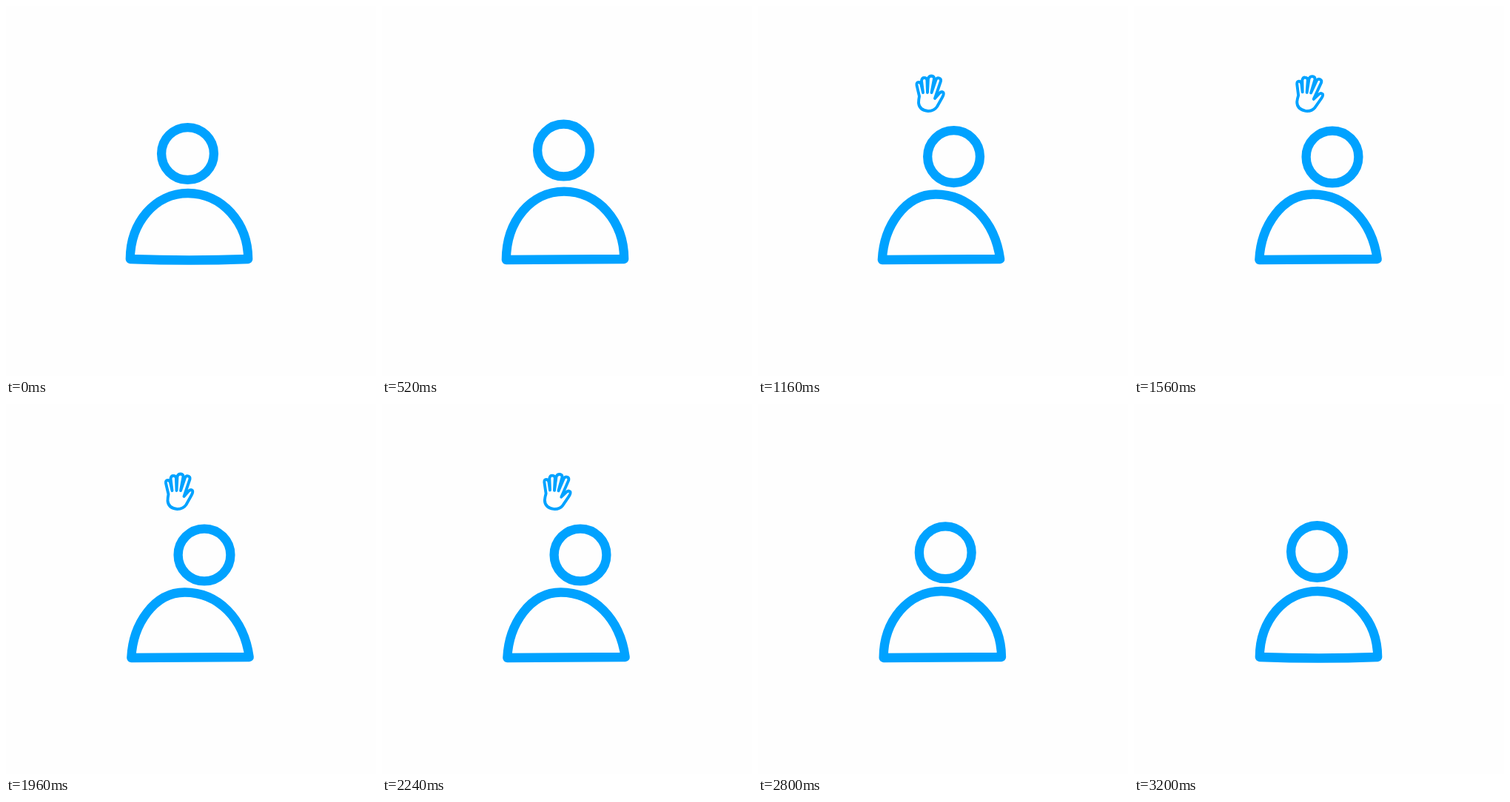
Recreate the animation shown at these times as an HTML page. Size 500 px wide and 500 px high, loop 4080 ms.

```html
<!DOCTYPE html>
<html lang="en">
<head>
<meta charset="utf-8">
<title>Waving person</title>
<style>
html, body { margin: 0; width: 100%; height: 100%; overflow: hidden; background: #fefefe; }
svg { display: block; width: 100%; height: 100%; fill: #fefefe; stroke: #00a2ff; stroke-width: 12.3; stroke-linejoin: round; }
</style>
</head>
<body>
<svg viewBox="0 0 500 500">
  <g id="person">
    <path id="hand" stroke-width="3.9" d="M218 122L214.5 107Q214 103 217 103Q219.5 103 220.5 106L223 117L221 101Q221.5 97 224.5 97Q228 97 228.4 100L229 117L230 98Q231 94.5 234.5 94.5Q238 95 238 98L234.5 117L240.5 99.5Q242 96.5 245 97.5Q247.5 98.5 247 101.5L239 125L245.5 117.5Q248 115 250.5 117Q251.5 119 249 123.5L242 136Q238 142 230 142Q218 141 217 131Q217 127 218 122Z"/>
    <path id="body"/>
    <circle id="head" r="35.4"/>
  </g>
</svg>
<script>
const LOOP = 4080, STEP = 40;
const el = id => document.getElementById(id);
const [hand, person, body, head] = ['hand', 'person', 'body', 'head'].map(el);

const part = (t, from, to) => Math.min(1, Math.max(0, (t - from) / (to - from)));
const ease = (t, from, to) => { const u = part(t, from, to); return u * u * (3 - 2 * u); };
const bump = (t, from, to) => Math.sin(Math.PI * part(t, from, to));
const mix = (a, b, u) => a + (b - a) * u;
const bezier = (a, b, c, u) => mix(mix(a, b, u), mix(b, c, u), u);

function drawBody(t, hop) {
  const lean = ease(t, 640, 1160) - ease(t, 2240, 2520);
  const squash = 8 * bump(t, 2240, 2800);
  const sag = 1 - ease(t, 0, 480) + ease(t, 2760, 3200);
  const left = 343 - sag, right = 342;
  const topX = 246 - 6 * lean, topY = 253 + 1.5 * lean + squash - 0.55 * hop;
  const hip = 293 + squash - 0.5 * hop;
  body.setAttribute('d', `M167.8 ${left}` +
    `C${168 + 2 * lean} ${hip + 4 * lean} ${201 - 2 * lean} ${topY} ${topX} ${topY}` +
    `C${292 - 7 * lean} ${topY} ${327 - 7 * lean} ${hip - 3 * lean} 327.2 ${right}` +
    `Q248 ${342.5 + 2.5 * sag} 167.8 ${left}Z`);
}

function drawHead(t, hop) {
  const lean = ease(t, 640, 1280) - ease(t, 2280, 3080);
  head.setAttribute('cx', 245.5 + 21 * lean);
  head.setAttribute('cy', 199.5 + 4.5 * lean - hop);
}

// Swings up from behind the body, waves, then rises a little and drops away
function drawHand(t) {
  const rise = ease(t, 640, 1160), drop = part(t, 2240, 2500);
  const wave = Math.sin(Math.PI * part(t, 1160, 2760) * 2) ** 2;
  const x = bezier(195, 100, 231, rise) + 0.5 * wave;
  const y = bezier(310, 190, 142, rise) + 90 * drop ** 2 * (2.2 * drop - 1.2);
  const size = 1 - 0.7 * (1 - rise) ** 3 - 0.8 * drop ** 2;
  const turn = 6 * wave * (1 - drop) - 40 * (1 - rise);
  hand.setAttribute('visibility', rise > 0 && drop < 1 ? 'visible' : 'hidden');
  hand.setAttribute('transform', `translate(${x} ${y}) rotate(${turn}) scale(${size}) translate(-231 -142)`);
}

function draw(t) {
  const hop = 8 * bump(t, 0, 640);
  const drift = 1.5 * ease(t, 1160, 1560) + 0.5 * ease(t, 2240, 3200);
  person.setAttribute('transform', `translate(${drift} 0)`);
  drawBody(t, hop);
  drawHead(t, hop);
  drawHand(t);
}

const start = performance.now();
function tick() {
  const t = (performance.now() - start) % LOOP;
  draw(Math.floor(t / STEP) * STEP);
  requestAnimationFrame(tick);
}
tick();
</script>
</body>
</html>
```
